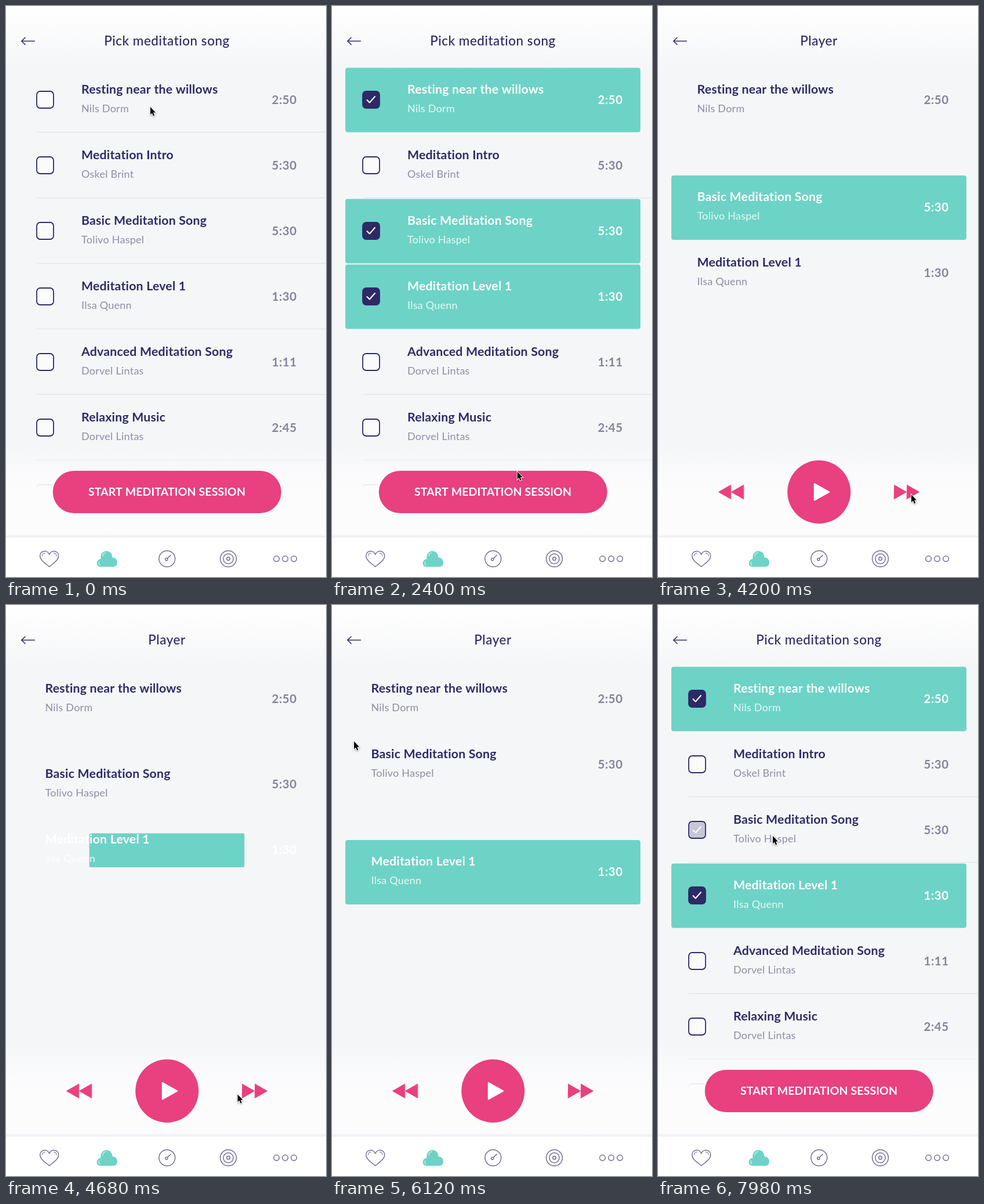
An HTML page with a canvas that plays this animation: 552 by 984 pixels, repeating every 8000 ms.

```html
<!DOCTYPE html>
<html lang="en">
<head>
<meta charset="utf-8">
<title>Meditation player</title>
<style>
html, body { margin: 0; width: 100%; height: 100%; overflow: hidden; background: #fff; }
canvas { display: block; width: 552px; height: 984px; }
</style>
</head>
<body>
<canvas id="stage"></canvas>
<script>
const W = 552, H = 984, LOOP = 8000;
const NAVY = '#2d2a66', TEAL = '#6dd3c6', PINK = '#e9407f', PAGE = '#f5f6f8';
const MUTED = '#84839b', SOFT = '#8e8da6', ICON = '#716f97', LINE = '#e1e2e9';
const ROW = 113, TOP = 105, GAP = 72.5;

// Moments of the interaction, in ms
const OPEN = 2600, BACK = 6742, UNCHECK = 7832, NEXT = [3250, 4500];

const rows = [
  { title: 'Resting near the willows', artist: 'Nils Dorm', time: '2:50', pick: 150, turn: [OPEN, NEXT[0]] },
  { title: 'Meditation Intro', artist: 'Oskel Brint', time: '5:30' },
  { title: 'Basic Meditation Song', artist: 'Tolivo Haspel', time: '5:30', pick: 1100, turn: NEXT, drop: UNCHECK },
  { title: 'Meditation Level 1', artist: 'Ilsa Quenn', time: '1:30', pick: 1750, turn: [NEXT[1], BACK] },
  { title: 'Advanced Meditation Song', artist: 'Dorvel Lintas', time: '1:11' },
  { title: 'Relaxing Music', artist: 'Dorvel Lintas', time: '2:45' },
  { title: 'Deep Breathing', artist: 'Ned Torvik', time: '1:01' },
  { title: 'Evening Calm', artist: 'Edwin Foskel', time: '3:11' },
  { title: 'Soft Rain', artist: 'Edwin Foskel', time: '1:13' }
];

// time, x, y of the pointer tip
const path = [
  [0, 249, 174], [350, 249, 174], [1020, 276, 369], [1150, 276, 369],
  [1620, 290, 490], [1800, 290, 490], [2440, 320, 806], [2700, 320, 808],
  [3150, 437, 842], [4550, 437, 842], [5220, 62, 856], [5650, 62, 856],
  [6350, 30, 27], [6600, 43, 52], [7030, 43, 52], [7200, 20, 28],
  [7750, 198, 398], [8000, 198, 398]
];

const canvas = document.getElementById('stage');
const g = canvas.getContext('2d');
const dpr = window.devicePixelRatio || 1;
canvas.width = W * dpr;
canvas.height = H * dpr;

const clamp = v => Math.max(0, Math.min(1, v));
const mix = (a, b, k) => a + (b - a) * k;
const ramp = (t, start, length) => clamp((t - start) / length);
const smooth = u => u * u * (3 - 2 * u);
const easeOut = u => 1 - (1 - u) ** 3;

// 1 on the list, 0 in the player
function listAmount(t, length, ease) {
  return t < BACK ? 1 - ease(ramp(t, OPEN, length)) : ease(ramp(t, BACK, length));
}

function faded(alpha, draw) {
  if (alpha <= 0) return;
  g.save();
  g.globalAlpha *= alpha;
  draw();
  g.restore();
}

function text(str, x, y, font, color, spacing, align = 'left') {
  g.font = font + ' Lato, "Open Sans", sans-serif';
  g.letterSpacing = spacing + 'px';
  g.textAlign = align;
  g.fillStyle = color;
  g.fillText(str, x, y);
}

function roundRect(x, y, w, h, r) {
  g.beginPath();
  g.roundRect(x, y, w, h, r);
}

function poly(points, close) {
  g.beginPath();
  points.forEach(([x, y]) => g.lineTo(x, y));
  if (close) g.closePath();
}

function circle(x, y, r) {
  g.beginPath();
  g.arc(x, y, r, 0, Math.PI * 2);
}

function stroke(color, width) {
  g.strokeStyle = color;
  g.lineWidth = width;
  g.stroke();
}

function fill(color) {
  g.fillStyle = color;
  g.fill();
}

function fadeRect(y0, y1, from, to) {
  const grad = g.createLinearGradient(0, y0, 0, y1);
  grad.addColorStop(0, from);
  grad.addColorStop(1, to);
  g.fillStyle = grad;
  g.fillRect(0, y0, W, y1 - y0);
}

function isPicked(row, t) {
  return row.pick !== undefined && t >= row.pick && !(t >= row.drop);
}

function rowState(row, t, p) {
  const picked = isPicked(row, t);
  let scale = 0, check = 0, white = picked;
  if (picked) {
    check = ramp(t, row.pick, 300);
    if (t < OPEN) {
      scale = smooth(ramp(t, row.pick, 450)) ** 2;
    } else if (t < BACK) {
      const [from, to] = row.turn;
      white = t >= from && t < to;
      if (white) scale = from === OPEN ? 1 : smooth(ramp(t, from, 350));
      else if (t < NEXT[0]) scale = p * p;
      check = p;
    } else {
      scale = p * p;
      check = row.drop ? 1 : p;
    }
  } else if (row.drop && t >= row.drop) {
    check = 1 - ramp(t, row.drop, 200);
  }
  return { picked, scale, check, white };
}

function checkbox(cy, amount) {
  roundRect(53, cy - 14.5, 29, 29, 6);
  fill('#fbfbfd');
  faded(amount, () => {
    fill(NAVY);
  });
  stroke(NAVY, 1.8);
  faded(clamp(amount * 4), () => {
    g.lineCap = g.lineJoin = 'round';
    poly([[60.5, cy + 0.5], [64.8, cy + 5], [74, cy - 5.5]]);
    stroke('#fff', 2);
  });
}

function drawRow(row, top, height, t, p, slide) {
  const s = rowState(row, t, p);
  const cy = top + 56.5;
  const x = mix(67.5, 130, slide);
  const shown = clamp(p * 4);
  faded(s.picked ? 1 : shown, () => {
    g.fillStyle = PAGE;
    g.fillRect(23, top, 509, ROW);
    if (!s.picked) {
      g.fillStyle = LINE;
      g.fillRect(53, top + height - 1, W - 53, 1);
    }
    if (s.scale > 0) {
      g.save();
      g.translate(277.5, cy + 0.5);
      g.scale(s.scale, s.scale);
      roundRect(-254.5, -55.5, 509, 111, 4);
      fill(TEAL);
      g.restore();
    }
    faded(shown, () => checkbox(cy, s.check));
    text(row.title, x, cy - 11, '700 21.3px', s.white ? '#fff' : NAVY, 0.2);
    text(row.artist, x, cy + 21, '400 18px', s.white ? 'rgba(255,255,255,.85)' : SOFT, 0.25);
    text(row.time, 458.5, cy + 7, '700 20.5px', s.white ? '#fff' : MUTED, 0.6);
  });
}

function drawRows(t, p, slide) {
  const basicGap = GAP * (smooth(ramp(t, 3500, 600)) - smooth(ramp(t, 4450, 450)));
  const levelGap = GAP * smooth(ramp(t, 5169, 600)) * (t >= BACK ? 1 - p : 1);
  const gaps = { 2: basicGap, 3: levelGap };
  let y = TOP;
  const placed = rows.map((row, i) => {
    const top = y + (gaps[i] || 0);
    const height = isPicked(row, t) ? ROW : ROW * p;
    y = top + height;
    return { row, top, height };
  }).reverse();
  // Picked rows lie above the others
  for (const layer of [false, true]) {
    for (const o of placed) {
      if (isPicked(o.row, t) === layer) drawRow(o.row, o.top, o.height, t, p, slide);
    }
  }
}

function drawHeader(list) {
  g.lineCap = g.lineJoin = 'round';
  poly([[33, 54.5], [26.8, 60.5], [33, 66.5]]);
  stroke(NAVY, 1.6);
  poly([[27, 60.5], [49.3, 60.5]]);
  stroke(NAVY, 1.6);
  const title = (str, a) => faded(a, () => text(str, 277.5, 68, '500 22.5px', NAVY, 0.5, 'center'));
  title('Pick meditation song', list);
  title('Player', 1 - list);
}

function skip(x, dir) {
  for (const dx of [0, 22 * dir]) {
    poly([[x + dx, 825.5], [x + dx + 21 * dir, 837.5], [x + dx, 849.5]], true);
    fill(PINK);
    g.lineJoin = 'round';
    stroke(PINK, 1);
  }
}

function drawControls(list, morph) {
  faded(1 - list, () => {
    skip(147.5, -1);
    skip(407.5, 1);
  });
  const w = mix(109, 394, morph), h = mix(109, 73, morph);
  const x = 277.75 - w / 2, y = 837.5 - h / 2;
  roundRect(x, y, w, h, h / 2);
  fill(PINK);
  faded(1 - clamp(morph / 0.3), () => {
    poly([[270, 823.5], [295, 837.5], [270, 851.5]], true);
    fill('#fff');
    g.lineJoin = 'round';
    stroke('#fff', 2.4);
  });
  faded(clamp((morph - 0.2) / 0.4), () => {
    g.beginPath();
    g.rect(x + 58, y, Math.max(0, w - 116), h);
    g.clip();
    text('START MEDITATION SESSION', 277.5, 843.7, '700 19.5px', '#fff', 0.1, 'center');
  });
}

function drawCloud() {
  g.beginPath();
  g.moveTo(163, 966.5);
  g.bezierCurveTo(154.5, 966.5, 154.5, 954, 163.5, 953);
  g.bezierCurveTo(161, 936, 183, 934.5, 183.5, 950.5);
  g.bezierCurveTo(194, 950, 195, 966.5, 185, 966.5);
  g.closePath();
  fill(TEAL);
  g.beginPath();
  g.arc(173, 948, 6, Math.PI, Math.PI * 1.45);
  stroke('rgba(255,255,255,.7)', 1.2);
  g.beginPath();
  g.arc(164.5, 960, 4.3, Math.PI * 0.7, Math.PI * 1.2);
  stroke('rgba(255,255,255,.7)', 1.2);
}

function drawNav() {
  fadeRect(910, 916, 'rgba(225,225,232,0)', 'rgba(225,225,232,.55)');
  g.fillStyle = '#fff';
  g.fillRect(0, 916, W, H - 916);
  g.lineCap = g.lineJoin = 'round';

  g.beginPath();
  g.moveTo(74.7, 966.3);
  g.bezierCurveTo(67, 960, 58.7, 954.5, 58.7, 947.5);
  g.bezierCurveTo(58.7, 938, 71.5, 936.8, 74.7, 945.3);
  g.bezierCurveTo(78, 936.8, 90.7, 938, 90.7, 947.5);
  g.bezierCurveTo(90.7, 954.5, 82.5, 960, 74.7, 966.3);
  stroke(ICON, 1.5);
  g.beginPath();
  g.arc(67, 947.5, 4.6, Math.PI, Math.PI * 1.5);
  stroke(ICON, 1.1);
  g.beginPath();
  g.arc(82.5, 947.5, 4.6, Math.PI * 1.5, Math.PI * 2);
  stroke(ICON, 1.1);

  drawCloud();

  circle(277.8, 952.6, 13.9);
  stroke(ICON, 1.5);
  circle(276.8, 953.6, 2.1);
  stroke(ICON, 1.4);
  poly([[278.4, 952], [284, 946.6]]);
  stroke(ICON, 1.6);

  for (const r of [13.9, 8.6, 2.8]) {
    circle(383.5, 952.6, r);
    stroke(ICON, 1.5);
  }
  for (const x of [466.6, 481.6, 496.6]) {
    circle(x, 952.6, 4.8);
    stroke(ICON, 1.5);
  }
}

function drawPointer(t) {
  const i = Math.max(1, path.findIndex(k => k[0] > t));
  const [t0, x0, y0] = path[i - 1], [t1, x1, y1] = path[i];
  const k = smooth(ramp(t, t0, t1 - t0));
  g.save();
  g.translate(mix(x0, x1, k), mix(y0, y1, k));
  g.lineJoin = 'miter';
  poly([[0, 0], [0, 13.2], [2.9, 10.4], [5.1, 15.4], [7.2, 14.5], [5.1, 9.6], [9, 9.4]], true);
  g.shadowColor = 'rgba(0,0,0,.35)';
  g.shadowBlur = 3 * dpr;
  g.shadowOffsetY = dpr;
  stroke('#fff', 2);
  g.shadowColor = 'transparent';
  fill('#000');
  g.restore();
}

function draw(t) {
  g.setTransform(dpr, 0, 0, dpr, 0, 0);
  g.fillStyle = PAGE;
  g.fillRect(0, 0, W, H);
  fadeRect(0, TOP, '#fff', PAGE);

  const p = listAmount(t, 600, smooth);
  const list = listAmount(t, 150, smooth);
  drawRows(t, p, listAmount(t, 250, easeOut));
  fadeRect(752, 832, 'rgba(252,252,253,0)', 'rgb(252,252,253)');
  g.fillStyle = '#fcfcfd';
  g.fillRect(0, 832, W, 84);
  drawHeader(list);
  drawControls(list, listAmount(t, 400, easeOut));
  drawNav();
  drawPointer(t);
}

const begin = performance.now();
function tick() {
  draw((performance.now() - begin) % LOOP);
  requestAnimationFrame(tick);
}
tick();
</script>
</body>
</html>
```
